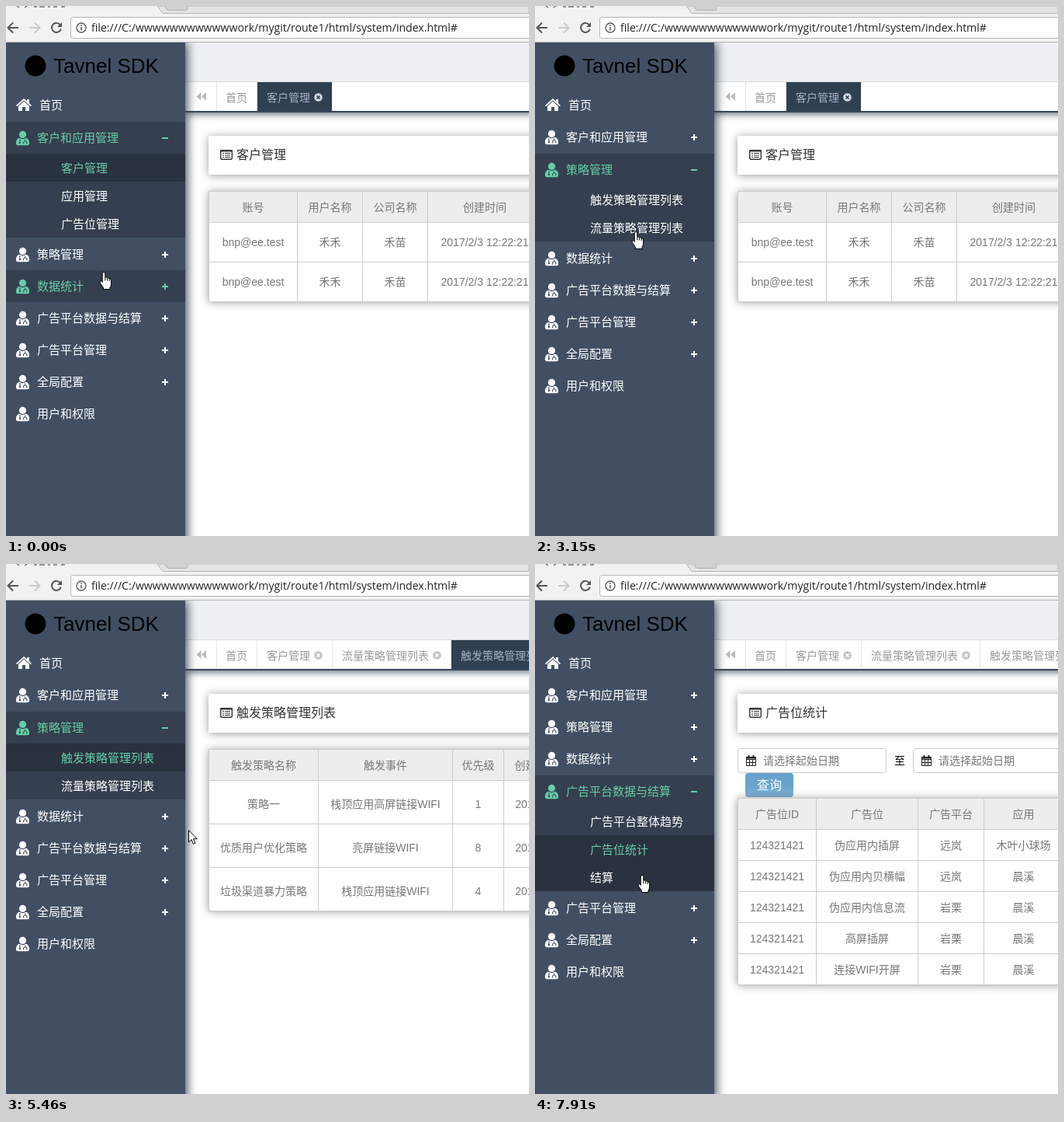
These frames come from a looping animation (674 px wide and 682 px high, 8 s). An HTML page:

```html
<!DOCTYPE html>
<html lang="zh-CN">
<head>
<meta charset="utf-8">
<style>
html, body { margin: 0; width: 100%; height: 100%; overflow: hidden; background: #fff }
svg { display: block }
text { font-family: "Liberation Sans", "Noto Sans CJK SC", "Noto Sans CJK", sans-serif; white-space: pre }
.url { font-family: "Open Sans", "Noto Sans", sans-serif }
.card { filter: drop-shadow(0 1px 6px rgba(0,0,0,.4)) }
.bar { filter: drop-shadow(0 2px 5px rgba(47,64,80,.8)) }
.side { filter: drop-shadow(2px 0 7px #2f4050) }
</style>
</head>
<body>
<svg width="674" height="682" viewBox="0 0 674 682">
  <defs>
    <linearGradient id="blue" x2="0" y2="1"><stop offset=".5" stop-color="#69a2cd"/><stop offset="1" stop-color="#86b4d8"/></linearGradient>
    <g id="doctor">
      <circle cy="-4.6" r="4.6"/>
      <path d="M-4 -.3Q0 2.6 4 -.3C7 0 8.6 3 8.6 7Q8.400 9.300 6 9.300H-6Q-8.400 9.300 -8.600 7C-8.600 3 -7 0 -4 -.3Z"/>
      <path d="M-3.6 1V5M3.2 1.500V4M1 7.500V6Q1 4 3.200 4T5.400 6V7.500" fill="none" stroke="#424f63" stroke-width="1.1"/>
      <circle cx="-3.6" cy="6" r="1.2" fill="#424f63"/>
    </g>
    <g id="calendar" fill="none" stroke="#222">
      <path d="M-6 -4.5H6V6.500H-6ZM-6 -1.500H6M-6 2.500H6M-2 -1V6M2 -1V6"/>
      <path d="M-6 -3.500H6M-3 -7V-4M3 -7V-4" stroke-width="2"/>
    </g>
    <g id="close"><circle r="5.7"/><path d="M-2 -2 2 2M2 -2 -2 2" stroke-width="1.7"/></g>
    <path id="hand" d="M-1.8 2Q-1.6 .5 0 .5T1.8 2V7.3Q3.6 6.4 4.6 8Q6.3 7.2 7.2 9Q9.5 8.5 9.6 11V16Q9.4 18.5 8 20V22.5H-.5V20.5L-4.6 14.5Q-5.4 12 -3.4 11.7L-1.8 13.5Z M1.8 7.5V11.5M4.6 8.2V11.5M7.2 9.2V12" fill="#fff" stroke="#000"/>
    <path id="arrow" d="M.5 .8V16L4 12.6 6.4 18.3 8.9 17.2 6.5 11.7H11.3Z" fill="#fff" stroke="#000"/>
    <path id="beam" d="M-3 -8H-1L0 -7 1 -8H3M0 -7V7M-3 8H-1L0 7 1 8H3" fill="none" stroke="#000" stroke-width="1.2"/>
  </defs>
  <rect width="674" height="682" fill="#fff"/>
  <g id="page"></g>
  <g id="tabs"></g>
  <rect class="side" y="47" width="231" height="660" fill="#424f63"/>
  <g id="menu"></g>
  <g id="chrome"></g>
  <g id="cursor"></g>
</svg>
<script>
const GREEN = '#65cea7', DARK = '#353f4f', DARKER = '#2a323f';
const LOOP = 8000, STEP = 70;

// pointer hot spot over time
const PATH = [
  [0,126,342], [70,126,336], [140,126,328], [630,126,328], [840,128,268], [980,128,268],
  [1470,343,209], [1540,343,209], [2030,547,33], [2100,547,33], [2240,594,16], [2380,540,25],
  [2450,540,25], [3150,130,290], [3290,130,290], [3780,134,253], [4060,134,253], [4690,470,140],
  [4760,470,140], [4900,515,52], [5040,480,112], [5110,480,112], [5460,235,342], [5740,205,414],
  [5950,179,385], [6090,151,384], [6440,151,384], [6720,139,330], [6930,139,330], [7140,138,368],
  [7350,138,372], [7770,139,396], [7840,139,396], [7910,138,400], [8000,138,400]
];

const MENU = [
  ['客户和应用管理', '客户管理', '应用管理', '广告位管理'],
  ['策略管理', '触发策略管理列表', '流量策略管理列表'],
  ['数据统计'],
  ['广告平台数据与结算', '广告平台整体趋势', '广告位统计', '结算'],
  ['广告平台管理'], ['全局配置'], ['用户和权限']
];

// start time, tab, menu group, sub item
const VIEWS = [[0,1,0,0], [3360,2,1,1], [4130,3,1,0], [7000,4,3,0], [7420,4,3,1]];
const TABS = [['首页',272,323], ['客户管理',324,420], ['流量策略管理列表',421,573], ['触发策略管理列表',574,726]];

const rect = (x, y, w, h, fill, more = '') => `<rect x="${x}" y="${y}" width="${w}" height="${h}" fill="${fill}" ${more}/>`;
const text = (x, cy, s, size = 14, fill = '#777', more = '') =>
  `<text x="${x}" y="${cy + size * .37}" font-size="${size}" fill="${fill}" ${more}>${s}</text>`;
const mid = (x, cy, s) => text(x, cy, s, 14, '#777', 'text-anchor="middle"');
const path = (d, stroke, width = 1, fill = 'none') => `<path d="${d}" stroke="${stroke}" stroke-width="${width}" fill="${fill}"/>`;
const use = (id, x, y, more = '') => `<use href="#${id}" x="${x}" y="${y}" ${more}/>`;

function table(xs, top, heads, rows, rowH, drop) {
  const left = xs[0], w = xs.at(-1) - left, h = 40 + rows.length * rowH, y0 = top + 40;
  let s = rect(left, top, w, h, '#fff', 'class="card"') + rect(left, top, w, 40, '#ededed');
  let d = `M${left} ${top + .5}h${w}`;
  for (let i = 0; i <= rows.length; i++) d += `M${left} ${y0 + i * rowH + .5}h${w}`;
  for (const x of xs) d += `M${x + .5} ${top}v${h}`;
  s += path(d, '#ccc');
  heads.forEach((head, c) => {
    const cx = (xs[c] + xs[c + 1]) / 2 + .5;
    s += mid(cx, top + 21, head);
    rows.forEach((row, r) => s += mid(cx, y0 + r * rowH + drop, row[c]));
  });
  return s;
}

function title(s) {
  return rect(261, 167, 450, 50, '#fff', 'class="card"') +
    rect(276.7, 185.7, 14.6, 11.6, 'none', 'rx="1.5" stroke="#333" stroke-width="1.4"') +
    path('M276 186.5h16', '#333', 2) +
    path('M279 189.5h2m1 0h7M279 192h2m1 0h7M279 194.5h2m1 0h7', '#333') +
    text(297, 191, s, 16, '#333');
}

const field = (x, w) => rect(x + .5, 237.5, w, 31, '#fff', 'rx="3" stroke="#ccc"') +
  use('calendar', x + 17.5, 253) + text(x + 33, 253, '请选择起始日期');
const dates = () => field(261, 191) + text(463, 253, '至', 14, '#000') + field(487, 191);
const select = (x, label, lx) => text(lx, 285, label, 14, '#000') +
  rect(x + .5, 269.5, 119, 31, '#fff', 'stroke="#ccc"') + text(x + 5, 286, '全部', 14, '#000') +
  path(`M${x + 106} 282h8l-4 6z`, 'none', 0, '#000');
const button = x => rect(x, 269, 62, 31, 'url(#blue)', 'rx="4"') + text(x + 15, 284, '查询', 16, '#fff');

const rules = () => table([261, 402, 575, 641, 725], 238, ['触发策略名称', '触发事件', '优先级', '创建时间'], [
  ['策略一', '栈顶应用高屏链接WIFI', 1, '2017/2/3'],
  ['优质用户优化策略', '亮屏链接WIFI', 8, '2017/2/3'],
  ['垃圾渠道暴力策略', '栈顶应用链接WIFI', 4, '2017/2/3']], 56, 31);

const PAGES = [
  () => title('客户管理') + table([261, 375, 459, 543, 690], 238, ['账号', '用户名称', '公司名称', '创建时间'],
    Array(2).fill(['bnp@ee.test', '禾禾', '禾苗', '2017/2/3 12:22:21']), 51, 26),
  () => title('流量策略管理创建或修改') + rules(),
  () => title('触发策略管理列表') + rules(),
  () => title('广告平台整体趋势') + dates() + select(337, '广告类型', 271) + select(519, '广告位', 467) + button(649) +
    table([261, 381, 478, 568, 658, 748], 301, ['日期', '请求数', '展现数', '填充率'],
      Array(11).fill(['2017/5/1', 445544, 23213, '80%']), 37, 19),
  () => title('广告位统计') + dates() + button(271) +
    table([261, 362, 493, 578, 680], 301, ['广告位ID', '广告位', '广告平台', '应用'], [
      ['伪应用内插屏', '远岚', '木叶小球场'], ['伪应用内贝横幅', '远岚', '晨溪'], ['伪应用内信息流', '岩栗', '晨溪'],
      ['高屏插屏', '岩栗', '晨溪'], ['连接WIFI开屏', '岩栗', '晨溪']].map(r => [124321421, ...r]), 40, 21)
];

function tabs(active, mx, my) {
  let s = rect(231, 98, 460, 39, '#fff', 'class="bar"') + rect(231, 47, 443, 51, '#eff0f4') +
    path('M231 97.5h443', '#d8d9dd') + rect(231, 135, 443, 2, '#3a485c') +
    path('M251.5 111l-6 5.5 6 5.5zM258 111l-6 5.5 6 5.5z', 'none', 0, '#bbb') + path('M271.5 98v37', '#e7e7e7');
  TABS.forEach(([name, x, end], i) => {
    if (i > active) return;
    const on = i == active, over = mx >= x && mx < end && my >= 98 && my < 135;
    const ink = on ? '#a7b1c2' : over ? '#777' : '#999', bg = on ? '#2f4050' : over ? '#f2f2f2' : '#fff';
    s += rect(x, 98, end - x, 37, bg) + text(x + (i ? 12 : 11), 117.5, name, 14, ink);
    if (!on) s += path(`M${end + .5} 98v37`, '#e7e7e7');
    if (i) s += use('close', end - 17.5, 117.5, `fill="${on ? '#d5d9df' : '#c4c4c4'}" stroke="${bg}"`);
  });
  return s;
}

const swing = (t, start, len) => .5 - .5 * Math.cos(Math.PI * Math.min(1, Math.max(0, (t - start) / len)));

function menu(t, view, mx, my) {
  const first = swing(t, 400, 160), second = swing(t, 6210, 400);
  const open = { 0: 108 * (1 - first), 1: 72 * first * (1 - second), 3: 108 * second };
  const active = t < 420 ? 0 : t < 6230 ? 1 : 3;
  const within = (top, h) => mx < 231 && my >= top && my < top + h;
  let y = 148;
  let s = `<circle cx="38" cy="77" r="13.5"/>` + text(61, 76.5, 'Tavnel SDK', 26, '#000') +
    path('M13 128l10-9 4 3.5V120h3v5l3 3-1.2 1.3L23 121.5l-8.8 7.8zM16 129l7-6.2 7 6.2v6h-5v-5h-4v5h-5z', 'none', 0, '#fff') +
    text(43, 127, '首页', 15, '#fff');
  MENU.forEach(([name, ...subs], i) => {
    const on = i == active;
    if (on) y++;
    const lit = on || within(y, 41), ink = lit ? GREEN : '#fff', cy = y + 20;
    if (lit) s += rect(0, y, 231, 41, DARK);
    s += use('doctor', 21.5, cy + 1, `fill="${ink}"`) + text(40, cy, name, 15, ink);
    if (i < 6) s += path(`M201 ${cy + 1}h8` + (on ? '' : `m-4 -4v8`), ink, 2);
    y += 41;
    const h = Math.round(open[i] || 0);
    if (!h) return;
    s += `<svg y="${y}" width="231" height="${h}">` + rect(0, 0, 231, h, DARK);
    subs.forEach((sub, k) => {
      const top = k * 36, here = view[2] == i, cur = here && view[3] == k;
      if (cur || here && within(y + top, Math.min(36, h - top))) s += rect(0, top, 231, 36, DARKER);
      s += text(71, top + 18, sub, 15, cur ? GREEN : '#fff');
    });
    s += '</svg>';
    y += h + 1;
  });
  return s;
}

function chrome() {
  return rect(0, 0, 674, 47, '#f2f2f2') + path('M195 0l5 7q1 2.5 4 2.5H674V0Z', '#b6b6b6', 1, '#e4e4e4') +
    path('M205 0l2 4q1 1.5 3 1.5h22q2 0 2-2V0', '#b0b0b0', 1, '#d0d0d0') +
    path('M14 0l3 2M27 0l-3 2M36 1h4m3 0h7m4 0h3m4 0h5m5 0h5', '#333') +
    path('M0 46.5H674', '#b4b4b4') +
    path('M16 28H3M9 21.5L2.5 28 9 34.5', '#555', 2) +
    path('M30 28H43M37 21.5l6.5 6.5-6.5 6.5', '#ccc', 2) +
    path('M70 24.5a6 6 0 1 0 .8 5', '#555', 2) + path('M72 21v6h-6z', 'none', 0, '#555') +
    rect(83.5, 14.5, 620, 27, '#fff', 'rx="3" stroke="#b5b5b5"') +
    `<circle cx="97" cy="28" r="6" fill="none" stroke="#555" stroke-width="1.3"/>` +
    path('M97 27v4.5M97 24v1.7', '#555', 1.5) +
    text(110, 27.5, 'file:///C:/wwwwwwwwwwwwork/mygit/route1/html/system/index.html#', 14.1, '#222', 'class="url"');
}

function pointer(t) {
  const i = Math.max(1, PATH.findIndex(k => k[0] >= t)), [t0, x0, y0] = PATH[i - 1], [t1, x1, y1] = PATH[i];
  const p = (t - t0) / (t1 - t0);
  return [Math.round(x0 + (x1 - x0) * p), Math.round(y0 + (y1 - y0) * p)];
}

const shown = {};
function put(id, html) {
  if (shown[id] !== html) document.getElementById(id).innerHTML = shown[id] = html;
}

function draw(now) {
  const t = Math.min(7910, Math.floor(now % LOOP / STEP) * STEP);
  const [x, y] = pointer(t), n = VIEWS.findLastIndex(v => v[0] <= t), view = VIEWS[n];
  const link = x < 231 && y > 107 || y >= 98 && y < 135;
  put('page', PAGES[n]());
  put('tabs', tabs(view[1], x, y));
  put('menu', menu(t, view, x, y));
  put('cursor', use(y < 46 ? 'beam' : link ? 'hand' : 'arrow', x, y));
}

put('chrome', chrome());
const start = performance.now();
function loop() {
  draw(performance.now() - start);
  requestAnimationFrame(loop);
}
loop();
</script>
</body>
</html>
```
